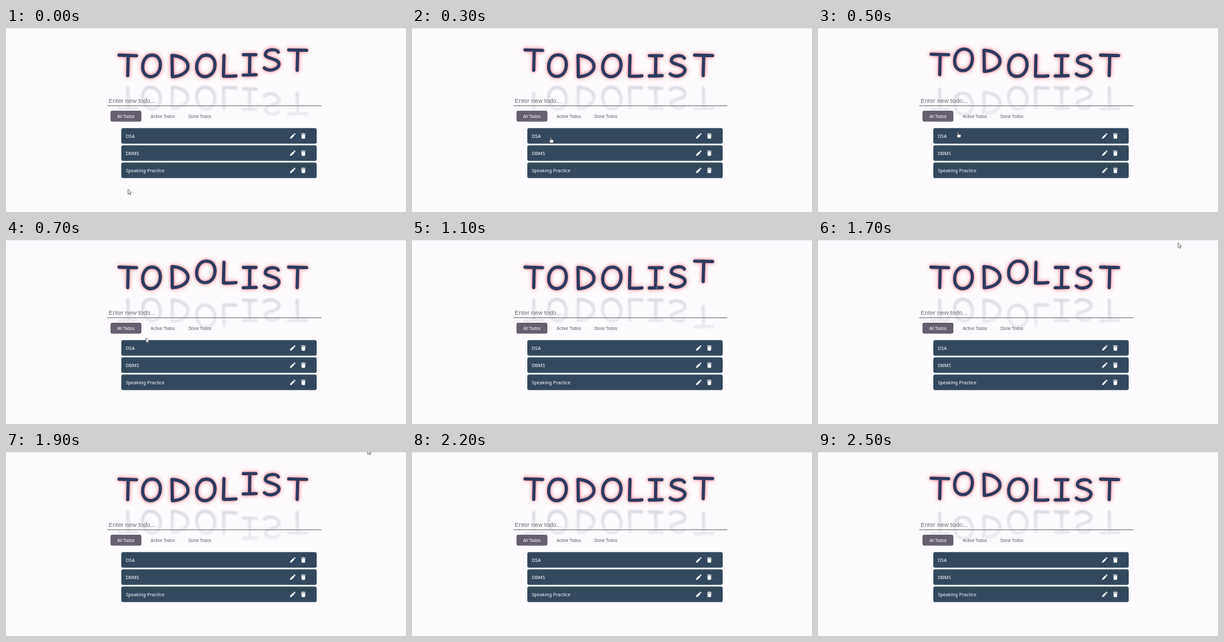
Write an HTML page that moves like this. It is 600 px wide and 278 px high and loops after 2600 ms.

```html
<!DOCTYPE html>
<html lang="en">
<head>
<meta charset="utf-8">
<title>Todo list</title>
<style>
  html, body { margin: 0; width: 100%; height: 100%; overflow: hidden; background: #fdfbfd; }
  svg { display: block; width: 600px; height: 278px; }
  .glow { filter: drop-shadow(0 0 1.6px #ff8f9e) drop-shadow(0 0 3px #ffa9b3); }
  .word path { fill: none; stroke: #2b3a5e; stroke-width: 4.8; stroke-linecap: round; stroke-linejoin: round; }
  .mirror { filter: blur(.8px); }
  .field, .tab { font-family: "Liberation Sans", Arial, sans-serif; }
  .field { font-size: 9.3px; fill: #707077; }
  .tab { font-size: 6.45px; fill: #5f5c66; }
  .tab.on { fill: #fff; }
  .item { font: 7px "Noto Sans", "Open Sans", sans-serif; fill: #fff; }
  .cursor { fill: #fff; stroke: #34343c; stroke-width: .65; stroke-linejoin: round; }
</style>
</head>
<body>
<svg viewBox="0 0 600 278">
  <defs>
    <linearGradient id="fade" gradientUnits="userSpaceOnUse" x1="0" y1="84" x2="0" y2="134">
      <stop offset="0" stop-color="#fff" stop-opacity=".17"/>
      <stop offset="1" stop-color="#fff" stop-opacity=".08"/>
    </linearGradient>
    <mask id="veil" maskUnits="userSpaceOnUse" x="150" y="80" width="330" height="64">
      <rect x="150" y="80" width="330" height="64" fill="url(#fade)"/>
    </mask>
    <g id="icons" fill="#fff">
      <path d="M426 167.2l.5-2.4 4.3-4.3 1.9 1.9-4.3 4.3zM431.4 159.9l.7-.7q.6-.5 1.2 0l.7.7q.5.6 0 1.2l-.7.7z"/>
      <path d="M442.6 159.6h2l.5-.7h1.8l.5.7h2v1h-6.8zM443.1 161.2h5.8l-.4 5.2q-.1.8-.8.8h-3.4q-.7 0-.8-.8z"/>
    </g>
  </defs>

  <rect width="600" height="1" fill="#e9e8ee"/>

  <g mask="url(#veil)"><g class="mirror">
    <use href="#word" transform="translate(0 163) scale(1 -1)"/>
  </g></g>
  <g class="glow"><g id="word" class="word" role="img" aria-label="TODOLIST">
    <path d="M169.5 41L196 41.8M183.3 41.5L182.6 72"/>
    <path d="M219 41C209 41 205 51 205 59C205 68 210 73.500 217 73.500C227 73.500 231.500 64 231.500 55.500C231.500 47 227 41 219 41Z"/>
    <path d="M249 41.500C262 42 273 48.500 273 58C273 67 262 73 249.500 73.500Z"/>
    <path d="M300.500 41C290.500 41 286 51 286 59C286 68 291 73.500 298.500 73.500C308.500 73.500 313.500 64 313.500 55.500C313.500 47 308.500 41 300.500 41Z"/>
    <path d="M327 41.500L326.200 72.800Q335 73.300 345 72.300"/>
    <path d="M356 41.800H375M365.700 42L365.300 72.200M355.800 72.500L375.300 72"/>
    <path d="M408.500 45.500C406 40 390 40.500 389 49C388.300 55.500 408.500 54.500 409.500 63C410 71.500 395 76 387.500 69.500"/>
    <path d="M424 41L451 41.600M437.600 41.500L436.800 72"/>
  </g></g>

  <text class="field" x="154" y="113">Enter new todo...</text>
  <rect x="152" y="117" width="321" height="1" fill="#77757c"/>

  <rect x="156.700" y="125" width="46.400" height="16.500" rx="2.400" fill="#665f70"/>
  <text class="tab on" x="166.700" y="135.600">All Todos</text>
  <text class="tab" x="217" y="135.600">Active Todos</text>
  <text class="tab" x="273.700" y="135.600">Done Todos</text>

  <g id="list"></g>

  <g class="cursor" id="cursor">
    <path id="arrow" d="M0 0V7.300L1.700 5.800 2.900 8.500 4.100 8 2.900 5.400H5.200Z"/>
    <path id="hand" d="M-.7.600Q0-.400.700.600V3.400L3.600 4Q4.500 4.300 4.400 5.300L3.800 8.800H-.2L-2.500 5.700Q-2.500 4.700-1.600 4.800L-.7 5.600Z"/>
    <path id="beam" fill="none" stroke="#8b8b9b" d="M-1.800-4H1.800M0-4V4M-1.800 4H1.800"/>
  </g>
</svg>
<script>
const LOOP = 2600, STEP = 100, RISE = 9.4;
const $ = id => document.getElementById(id);
const letters = [...$('word').children];
const cursor = $('cursor');

$('list').innerHTML = ['DSA', 'DBMS', 'Speaking Practice'].map((label, i) => `
  <g transform="translate(0 ${i * 26})">
    <rect x="173" y="151.300" width="293" height="23.500" rx="2.400" fill="#33485d"/>
    <text class="item" x="179.700" y="165.700">${label}</text>
    <use href="#icons"/>
  </g>`).join('');

// time, x, y of the pointer tip
const route = [
  [0, 183, 243.5], [100, 187, 232], [300, 208, 165], [500, 210, 157],
  [700, 210, 148], [800, 225, 138], [1100, 367.5, 69],
  [1300, 470, 34], [1500, 532, 13], [1700, 540, 4], [1900, 542.5, -4], [2000, 543, -12]
];

// cubic-bezier(.25, .1, .25, 1)
function ease(x) {
  let lo = 0, hi = 1, u = .5;
  for (let n = 0; n < 20; n++) {
    u = (lo + hi) / 2;
    const v = 1 - u;
    if (.75 * u * v * v + .75 * u * u * v + u ** 3 < x) lo = u; else hi = u;
  }
  return .3 * u * (1 - u) ** 2 + 3 * u * u * (1 - u) + u ** 3;
}

function lift(i, t) {
  const phase = ((t / 100 - 1.9 - i) % 10 + 10) % 10 / 2;
  return phase < 1 ? ease(phase) : phase < 2 ? 1 - ease(phase - 1) : 0;
}

function pointer(t) {
  const n = route.findIndex(p => p[0] > t);
  if (n < 0) return route[route.length - 1].slice(1);
  const [t0, x0, y0] = route[n - 1], [t1, x1, y1] = route[n];
  const k = (t - t0) / (t1 - t0);
  return [x0 + (x1 - x0) * k, y0 + (y1 - y0) * k];
}

function shape(x, y) {
  const within = (l, t, r, b) => x > l && x < r && y > t && y < b;
  if (within(173, 151, 466, 227) || within(157, 125, 317, 141)) return 'hand';
  if (within(152, 102, 473, 118) || within(168, 36, 453, 80)) return 'beam';
  return 'arrow';
}

function draw(t) {
  letters.forEach((el, i) =>
    el.setAttribute('transform', `translate(0 ${(-RISE * lift(i, t)).toFixed(2)})`));
  const [x, y] = pointer(t), kind = shape(x, y);
  cursor.setAttribute('transform', `translate(${x} ${y})`);
  for (const id of ['arrow', 'hand', 'beam'])
    $(id).setAttribute('visibility', id === kind ? 'visible' : 'hidden');
}

const start = performance.now();
function tick() {
  const t = (performance.now() - start) % LOOP;
  draw(Math.floor(t / STEP) * STEP);
  requestAnimationFrame(tick);
}
tick();
</script>
</body>
</html>
```
